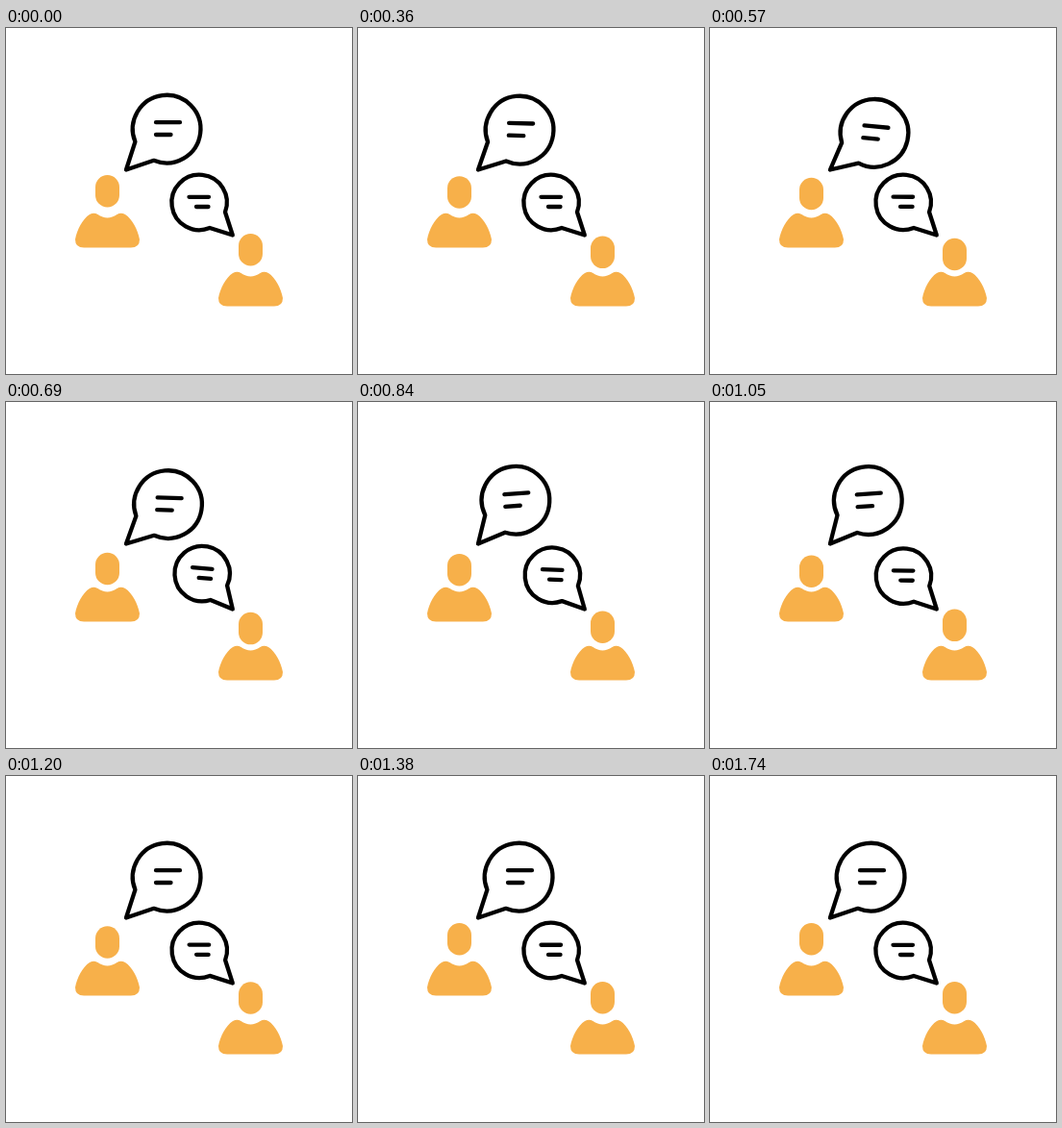
Recreate the animation shown at these times as an HTML page. Size 360 by 360 pixels, loop 1.8 s.

```html
<!DOCTYPE html>
<html lang="en">
<head>
<meta charset="utf-8">
<title>Two people chatting</title>
<style>
  html, body { margin: 0; width: 100%; height: 100%; overflow: hidden; background: #fff; }
  svg { display: block; width: 100vw; height: 100vh; }
  .person { fill: #f7b04a; }
  .bubble { fill: none; stroke: #000; stroke-width: 4.3; stroke-linecap: round; stroke-linejoin: round; }
</style>
</head>
<body>
<svg viewBox="0 0 360 360">
  <defs>
    <rect id="head" x="93" y="153" width="25" height="33.5" rx="12.5"/>
    <path id="body" d="M81 228.600 Q72 228.600 72 220 C74 209.500 79.500 199 87 194 Q91.500 191.500 95.500 194 C102 198.500 109 198.500 115.500 194 Q119.500 191.500 124 194 C131.500 199 137 209.500 139 220 Q139 228.600 130 228.600 Z"/>
  </defs>
  <g class="person">
    <use href="#body"/>
    <use id="headLeft" href="#head"/>
  </g>
  <g class="person" transform="translate(149 61)">
    <use href="#body"/>
    <use id="headRight" href="#head"/>
  </g>
  <g id="bubbleLeft" class="bubble">
    <path d="M134.400 118.300 L125 147.500 L153.800 137.800 A35.300 35.300 0 1 0 134.400 118.300 Z"/>
    <path d="M156 98.200 H181 M156 111 H171.500"/>
  </g>
  <g id="bubbleRight" class="bubble">
    <path d="M228 191.500 L235.800 215.500 L212 208 A28.700 28.700 0 1 1 228 191.500 Z"/>
    <path d="M190.500 175.800 H211 M198 186 H210.500"/>
  </g>
</svg>
<script>
  const LOOP = 1800;
  const STEP = 30;

  const clamp = u => Math.min(1, Math.max(0, u));
  const progress = (t, from, to) => clamp((t - from) / (to - from));

  // One full swing to each side
  const sway = (t, from, to) => Math.sin(2 * Math.PI * progress(t, from, to));

  // Eased push, then a fading return
  function nudge(t, from, peak, fade) {
    const u = progress(t, from, peak);
    return u * u * (3 - 2 * u) * Math.exp(-Math.max(0, t - peak) / fade);
  }

  // Steady sink and rise
  const dip = (t, from, low, to) => progress(t, from, low) - progress(t, low, to);

  const set = (id, transform) =>
    document.getElementById(id).setAttribute("transform", transform);

  function draw() {
    const t = Math.floor(performance.now() % LOOP / STEP) * STEP;
    set("bubbleLeft", `rotate(${5.7 * sway(t, 330, 1140)} 125 147.5)`);
    set("bubbleRight", `rotate(${5 * nudge(t, 555, 700, 160)} 235.8 215.5)`);
    set("headLeft", `translate(0 ${6.5 * dip(t, 210, 1050, 1350)})`);
    set("headRight", `translate(0 ${5.4 * dip(t, 120, 630, 1230)})`);
    requestAnimationFrame(draw);
  }
  draw();
</script>
</body>
</html>
```
